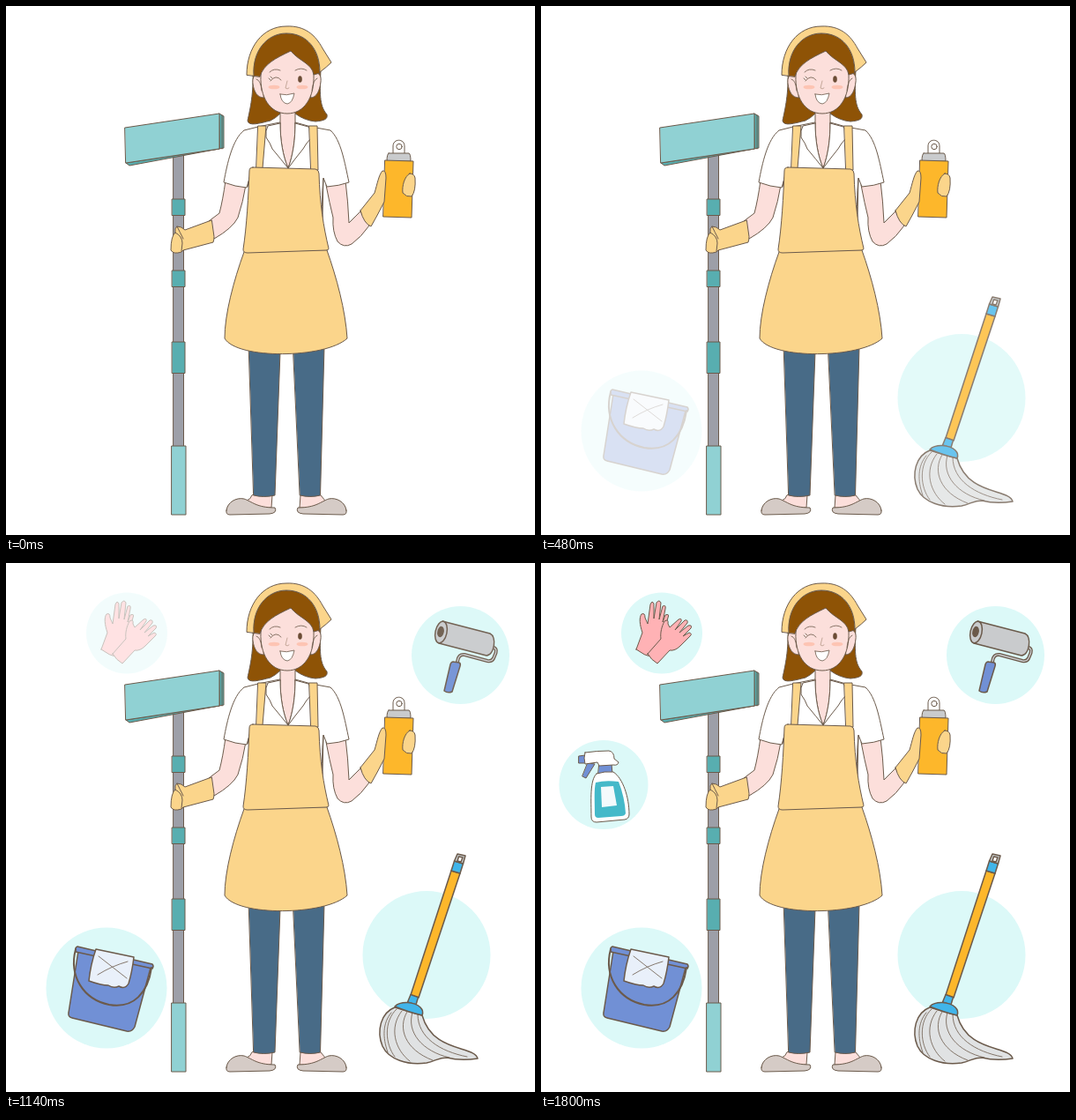
Recreate the animation shown at these times as an HTML page without scripts. Size 600x600 px, loop 2.47 s.

```html
<!DOCTYPE html>
<html lang="en">
<head>
<meta charset="utf-8">
<title>Cleaning kit</title>
<style>
html, body { margin: 0; width: 100%; height: 100%; overflow: hidden; background: #fff; }
svg { display: block; width: 100vw; height: 100vh; }
.ink { stroke: #6b5a4b; stroke-width: 1; stroke-linejoin: round; stroke-linecap: round; fill: none; }
.bold { stroke-width: 1.5; }
.fine { stroke-width: .8; }
.disc { fill: #dcf9f8; stroke: none; }
.skin { fill: #fcdfdb; }
.hair { fill: #8e5306; }
.cloth { fill: #fbd58b; }
.white { fill: #fff; }
.jean { fill: #486b87; }
.shoe { fill: #d5cbc6; }
.aqua { fill: #90d1d3; }
.teal { fill: #58aeb0; }
.pole { fill: #9d9fa8; }
.gray { fill: #c9cbcd; }
.blue { fill: #7190d5; }
.sky { fill: #41b5ea; }
.gold { fill: #fdb72b; }
.pink { fill: #ffb2b5; }

/* each item fades in over 570 ms, in 30 ms steps */
.item { opacity: 0; animation: 2470ms linear infinite; }
.mop { animation-name: mop; }
.bucket { animation-name: bucket; }
.roller { animation-name: roller; }
.gloves { animation-name: gloves; }
.spray { animation-name: spray; }
@keyframes mop {
  0% { opacity: 0; }
  1.2146% { opacity: 0; animation-timing-function: steps(19); }
  24.2915%, 100% { opacity: 1; }
}
@keyframes bucket {
  0% { opacity: 0; }
  13.3603% { opacity: 0; animation-timing-function: steps(19); }
  36.4372%, 100% { opacity: 1; }
}
@keyframes roller {
  0% { opacity: 0; }
  24.2915% { opacity: 0; animation-timing-function: steps(19); }
  47.3684%, 100% { opacity: 1; }
}
@keyframes gloves {
  0% { opacity: 0; }
  37.6518% { opacity: 0; animation-timing-function: steps(19); }
  60.7287%, 100% { opacity: 1; }
}
@keyframes spray {
  0% { opacity: 0; }
  49.7976% { opacity: 0; animation-timing-function: steps(19); }
  72.8745%, 100% { opacity: 1; }
}
</style>
</head>
<body>
<svg viewBox="0 0 600 600">

  <g class="ink">
    <!-- legs -->
    <path class="skin" d="M279 555Q277 560 273 561C280 567 290 570 301 569L302 555ZM334 555L333 569C344 570 354 567 362 561L357 555Z"/>
    <path class="shoe" d="M250 572C251 563 261 557 270 559C279 562 284 569 305 569Q308 575 299 576L254 577Q249 577 250 572Z"/>
    <path class="shoe" d="M386 572C385 563 375 557 366 559C357 562 352 569 331 569Q328 575 337 576L382 577Q387 577 386 572Z"/>
    <path class="jean" d="M275.500 386L311 392L305 555Q292 558 281 555Z"/>
    <path class="jean" d="M326 392L361 386L356.500 555Q345 558 333.500 555Z"/>

    <!-- arms -->
    <path class="skin" d="M249 198Q246 220 242 235L230 244L236 264Q257 252 263 240Q269 222 272 203Z"/>
    <path class="skin" d="M363 203Q367 224 371 240Q370 256 376 267Q383 275 392 270Q403 262 412 249L402 233L389 246Q388 222 385 198Z"/>

    <!-- blouse -->
    <path class="white" d="M286 137L270 141C257 151 251 178 247 200Q260 205 273 206L279 185L278 270L360 270Q357 222 360 195L364 205Q378 204 389 200C384 177 380 152 368 141L346 137L328 132H311Z"/>
    <path d="M359 240L360 196M274 205L278 186"/>
    <path class="hair" d="M280 72C281 100 277 116 274 130C275 137 288 133 300 130Q306 127 311 122H328Q339 130 351 131C362 130 365 128 364 123C355 113 356 98 357 72Z"/>
    <path class="skin" d="M311 118V133C311 152 314 170 320 184C326 168 328 150 328 133V118Z"/>
    <path class="white" d="M311 133L297 136Q294 141 295 149Q300 156 302 162Q312 174 320 184C314 170 311 152 311 133ZM328 133L343 137Q348 143 346 150Q340 156 337 162Q328 173 320 184C326 168 328 150 328 133Z"/>

    <!-- apron -->
    <path class="cloth" d="M286 136H295L291 184H284ZM344 136H353L354 186H346Z"/>
    <path class="cloth" d="M270 279C258 312 248 350 248 377C262 401 362 400 387 377C385 345 375 308 364 277Z"/>
    <path class="cloth" d="M280 183L351 185Q355 186 355 190C356 225 360 250 366 275Q366 277 363 277L274 280Q269 280 269 276C273 250 275 215 276 187Q276 183 280 183Z"/>

    <!-- head -->
    <path class="skin" d="M291 79C284 74 279 79 280 88C281 97 285 104 292 104ZM346 79C353 73 358 77 357 86C356 96 352 104 346 104Z"/>
    <path class="skin" d="M322 40C304 48 289 62 289 79C288 103 299 122 319 122C338 122 350 104 349 78C350 62 336 46 322 40Z"/>
    <path class="hair" d="M280 79C279 51 296 31 318 31C341 31 356 49 356 76L349 78C347 65 333 63 323 51C306 59 292 66 288 80Z"/>
    <path class="cloth" d="M273 78C273 47 291 23 318 23C339 22 351 33 359 48L369 64Q364 69 356 75C356 49 341 31 318 31C296 31 279 51 281 79Z"/>
    <path class="fine" d="M284 83Q289 84 290 96M353 82Q348 84 347 96M299 75Q304 70 311 73M328 73Q335 69 341 73M300 85Q306 77 312 84M300 84L298 82M302 82L300 80"/>
    <path class="fine" stroke="#b79a8a" style="stroke:#b79a8a" d="M319 85L317 93Q319 95 321 93"/>
    <ellipse cx="333.500" cy="83" rx="2.300" ry="3.800" fill="#6b4c35" stroke="none"/>
    <g fill="#fdc4b3" stroke="none">
      <ellipse cx="304" cy="92" rx="6.500" ry="2.300"/>
      <ellipse cx="336" cy="92" rx="6.500" ry="2.300"/>
    </g>
    <path class="white fine" d="M311 100Q318 102 327 99Q325 110 319 111Q312 110 311 100Z"/>

    <!-- window squeegee -->
    <rect class="pole" x="190" y="168" width="11.500" height="332"/>
    <path class="teal" d="M242 122L247 125V161L140 181L136 178L242 162Z"/>
    <path class="aqua" d="M135 138L242 122V162L136 178Z"/>
    <path d="M245 124V162"/>
    <rect class="teal" x="188.500" y="219" width="14.500" height="18.500"/>
    <rect class="teal" x="188.500" y="300" width="14.500" height="18.500"/>
    <rect class="teal" x="188.500" y="381" width="14.500" height="35.500"/>
    <rect class="aqua" x="188" y="499" width="16" height="78"/>
    <path class="cloth" d="M233 243L203 254Q199 250 194 250Q191 252 192 257Q187 261 187 277Q190 282 199 279L201 277L235 268Q236 265 236 262Z"/>
    <path d="M192 257Q200 261 200 269L199 278M194 250Q197 256 201 264"/>

    <!-- bottle -->
    <path class="white" d="M439 168V159C439 150 452 150 452 159V168Z"/>
    <circle class="white" cx="446" cy="159.500" r="3.200"/>
    <path class="gray" d="M434 167H457Q459 168 459 176H432Q432 168 434 167Z"/>
    <path class="gold" d="M430 175L462 176L460 240L428 239Z"/>
    <path class="cloth" d="M402 232L418 212C421 202 423 191 427 187Q431 186 431 195L429 222Q421 238 414 250Q406 247 402 232Z"/>
    <path class="cloth" d="M458 190C452 193 449 204 450 212Q454 217 460 216Q465 210 464 195Q463 190 458 190Z"/>
  </g>

  <g class="item mop ink bold">
    <circle class="disc" cx="477" cy="444.500" r="72.500"/>
    <path d="M441 504C425 510 420 531 427 548C434 563 455 570 477 567C487 565 490 561 500 561C512 564 522 564 535 562C531 547 484 556 472 513Z" fill="#e0e2e3"/>
    <path class="fine" d="M443 506C428 520 430 546 441 560M449 508C434 527 441 552 458 565M455 509C444 527 452 552 484 564M461 510C454 532 472 554 503 561M467 512C467 538 492 554 523 560M437 510C427 522 427 538 433 555"/>
    <path class="gold" d="M505 349L515 352L468 493L459 490Z"/>
    <path class="sky" d="M508.500 338L518.500 341L515 352L505 349ZM459 489.500L467.500 492.500L465 501L455.500 498Z"/>
    <path fill="#c3c8c9" d="M512 330L521 332L518.500 341L508.500 338Z"/>
    <path class="white" d="M513.500 333L518 334L516 339L512 338Z"/>
    <path class="sky" d="M441 503C447 497 463 497 470 504Q474 508 472 513Q458 510 441 503Z"/>
  </g>

  <g class="item bucket ink bold">
    <circle class="disc" cx="114" cy="482" r="68.500"/>
    <path class="blue" d="M82 440L164 459L146 526Q143 532 137 531L75 516Q70 515 71 510Z"/>
    <path class="blue" d="M81 435L166 455Q168 457 166 460L79 441Q78 436 81 435Z"/>
    <path stroke-width="2" d="M79 438C71 469 88 495 117 501C145 506 161 487 165 459"/>
    <path d="M102 438L145 447Q143 464 139 477Q135 484 128 480Q122 483 116 479Q108 479 94 474Q96 455 102 438Z" fill="#e9f0fa"/>
    <path class="fine" d="M105 446L137 471M138 452Q120 457 104 467"/>
  </g>

  <g class="item roller ink bold">
    <circle class="disc" cx="515.500" cy="104.500" r="55.500"/>
    <path id="wire" stroke-width="4" d="M552 96Q557 96 555.500 102L553 108Q551 112 546 111L520 104Q513 103 512 112"/>
    <use href="#wire" style="stroke:#c9cbcd" transform="translate(0 0)" stroke-dasharray="0 200"/>
    <path style="stroke:#c9cbcd" stroke-width="1.400" d="M552 96Q557 96 555.500 102L553 108Q551 112 546 111L520 104Q513 103 512 112"/>
    <path class="gray" d="M495 66L549 80C557 84 554 104 545 105L491 91Z"/>
    <ellipse class="gray" cx="493.500" cy="78.500" rx="6.500" ry="12.500" transform="rotate(12 493.500 78.500)"/>
    <ellipse cx="493" cy="78" rx="3" ry="5.500" transform="rotate(12 493 78)" fill="#6b5a4b"/>
    <path class="blue" d="M507 112L514 113Q516 114 515 117L506 146Q501 148 497 145L504 115Q505 112 507 112Z"/>
  </g>

  <g class="item gloves ink">
    <circle class="disc" cx="137" cy="79.500" r="46"/>
    <path class="pink" d="M108 98L115 79C112 70 111 62 114 58Q118 56 118 62L121 69L124 47Q126 42 128 46L128 63L131 45Q134 41 136 45L134 64L138 49Q142 47 141 52L138 67L141 59Q146 57 144 62L138 84L127 107Q117 105 108 98Z"/>
    <path class="pink" d="M121 103L136 86C135 79 137 72 140 66Q145 63 144 69L146 73L156 64Q160 62 159 66L152 76L163 65Q167 64 166 68L157 79L167 71Q172 70 170 74L161 83L168 79Q172 80 169 83L158 94Q152 100 146 99L132 114Q125 110 121 103Z"/>
  </g>

  <g class="item spray ink">
    <circle class="disc" cx="71" cy="251.500" r="50.500"/>
    <path class="blue" d="M53 227L61 228L51 244L47 242ZM43 219L50 218V227L43 227Z"/>
    <path class="blue" d="M66 229L80 228L81 239H65Z"/>
    <path class="white" d="M50 215Q64 213 77 213Q83 214 83 222L88 226Q87 230 82 229L66 230L64 226L50 228Q48 221 50 215Z"/>
    <path class="white" d="M63 239Q72 236 82 237C93 244 100 266 100 285Q100 290 95 291L63 294Q57 294 57 288C57 270 55 246 63 239Z"/>
    <path d="M62 249Q73 246 88 248Q95 266 96 284Q95 287 91 287L65 289Q61 289 61 285C61 270 60 257 62 249Z" fill="#45b9c9" stroke="none"/>
    <path d="M68 254L82 253L86 275L69 277Z" fill="#f4fafc" stroke="none"/>
  </g>
</svg>
</body>
</html>
```
